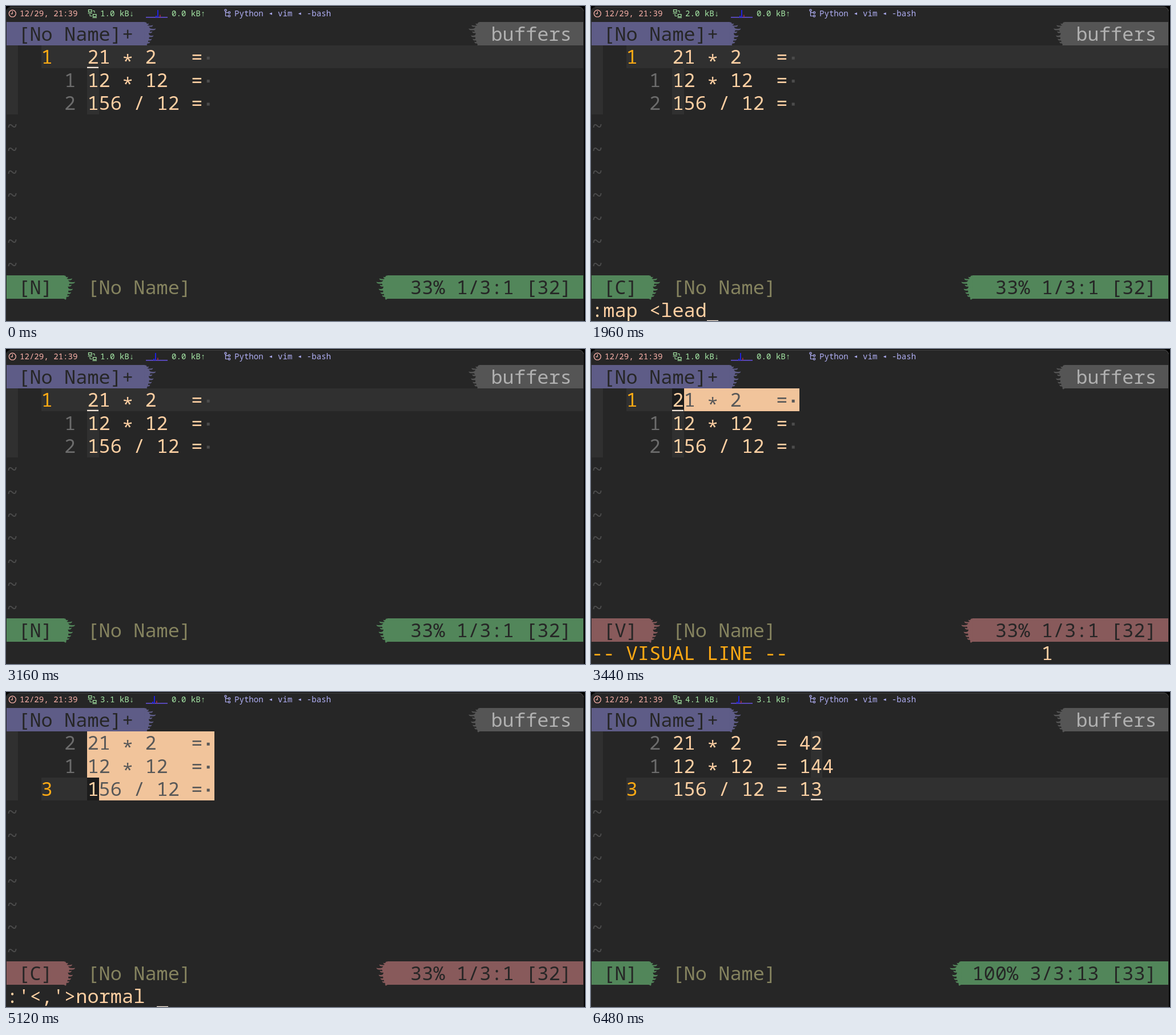
Write an HTML page with a canvas that moves like this. It is 1014x552 px and loops after 6520 ms.

```html
<!DOCTYPE html>
<html lang="en">
<head>
<meta charset="utf-8">
<title>Vim calculator mapping</title>
<style>
html, body { margin: 0; width: 100%; height: 100%; overflow: hidden; background: #000; }
canvas { display: block; width: 1014px; height: 552px; }
</style>
</head>
<body>
<canvas id="stage" width="1014" height="552"></canvas>
<script>
const ctx = document.getElementById('stage').getContext('2d');
const LOOP = 6520;
const CELL = 20.2, LINE = 40.37;
const FONT = '"Noto Sans Mono", "DejaVu Sans Mono", monospace';
const BG = '#262626', SHADE = '#303030', TEXT = '#ffd0a3', SELECT = '#f1c49b';
const GREY = '#6c6c6c', DIM = '#4c4c4c', ORANGE = '#ffaa14', WHITE = '#fff0e2';
const GREEN = '#52865a', RED = '#885a5b', TAB = '#5e5c87';
const PINK = '#f8b0a8', MINT = '#a6e8a6', LILAC = '#b0aff5';

const SUMS = ['21 * 2   =', '12 * 12  =', '156 / 12 ='];
const ANSWERS = ['42', '144', '13'];
const MAP_COMMAND = ':map <leader>cr';
const RUN_COMMAND = ":'<,'>normal ,cr";

// Moments of the session in ms
const AT = { colon: 640, listing: 2360, back: 3000, visual: 3440, line2: 3640, line3: 3800, range: 4040, run: 5760 };

const colX = col => 1 + col * CELL;
const rowY = row => 28.4 + row * LINE;

function rect(x, y, w, h, color) {
  ctx.fillStyle = color;
  ctx.fillRect(x, y, w, h);
}

function cells(col, row, count, color) {
  const x = Math.round(colX(col)), y = Math.round(rowY(row));
  rect(x, y, Math.round(colX(col + count)) - x, Math.round(rowY(row + 1)) - y, color);
}

function write(text, col, row, color) {
  ctx.font = '33.6px ' + FONT;
  ctx.fillStyle = color;
  [...text].forEach((char, i) =>
    ctx.fillText(char, colX(col + i), rowY(row) + (char === '*' ? 40 : 32.5)));
}

function small(text, x, color) {
  ctx.font = '14.1px ' + FONT;
  ctx.fillStyle = color;
  ctx.fillText(text, x, 18);
}

function cursor(col, row) {
  rect(Math.round(colX(col)), rowY(row) + 37.9, 20, 2.2, WHITE);
}

function line(color, width, ...points) {
  ctx.strokeStyle = color;
  ctx.lineWidth = width;
  ctx.beginPath();
  points.forEach(([x, y]) => ctx.lineTo(x, y));
  ctx.stroke();
}

// Ragged edge, one cell wide; side 1 points right, -1 points left
function flame(col, row, color, side) {
  const tips = [[7, 2], [14, 5], [19, 11], [13, 16], [15, 23], [12, 29], [9, 34], [4, 39]];
  ctx.save();
  ctx.translate(colX(side > 0 ? col : col + 1), rowY(row));
  ctx.scale(side, 1);
  ctx.fillStyle = color;
  ctx.beginPath();
  ctx.moveTo(-1, 0);
  ctx.lineTo(2, 0);
  tips.forEach(([x, y]) => {
    ctx.quadraticCurveTo(x * 0.45, y + 2, x, y);
    ctx.quadraticCurveTo(x - 1, y + 4, x * 0.5, y + 3);
  });
  ctx.lineTo(-1, LINE);
  ctx.fill();
  ctx.restore();
}

function drawWindow() {
  rect(0, 0, 1014, 552, '#000');
  ctx.fillStyle = BG;
  ctx.beginPath();
  ctx.roundRect(0, 1, 1012, 570, 9);
  ctx.fill();
  ctx.strokeStyle = '#4a4a4a';
  ctx.lineWidth = 1;
  ctx.beginPath();
  ctx.moveTo(7, 1.8);
  ctx.lineTo(1003, 1.8);
  ctx.quadraticCurveTo(1010, 2, 1011.5, 9);
  ctx.stroke();
}

function drawMeters(t) {
  const tick = Math.floor((t + 950) / 1000);
  const down = ['1.0', '1.0', '2.0', '1.0', '1.0', '2.0', '3.1', '4.1'][tick];
  const up = tick < 7 ? '0.0' : '3.1';

  ctx.strokeStyle = PINK;
  ctx.lineWidth = 1.3;
  ctx.beginPath();
  ctx.arc(11.3, 13.2, 6, 0, 7);
  ctx.stroke();
  line(PINK, 1.2, [11.3, 9], [11.3, 13.7], [8.3, 13.7]);
  small('12/29, 21:39', 24, PINK);

  ctx.strokeStyle = MINT;
  ctx.lineWidth = 1.2;
  ctx.strokeRect(144.5, 6.6, 5.5, 4);
  ctx.strokeRect(152.5, 14.6, 5.5, 4);
  line(MINT, 1, [143.5, 13], [151, 13]);
  line(MINT, 1, [151.5, 20.5], [159, 20.5]);
  line(MINT, 1, [147, 14], [147, 17.5], [151, 17.5]);
  line(MINT, 1, [152, 8.5], [155, 8.5], [155, 12]);
  small(down + ' kB↓', 165, MINT);
  small(up + ' kB↑', 290, MINT);

  const peak = 266 - tick;
  rect(245, 19, 38, 1.6, '#6350d8');
  rect(peak - 1, 7, 1.8, 13, '#2222ee');
  rect(peak - 4, 17, 2, 3, '#2222ee');
  rect(peak + 3, 15.5, 1.6, 4, '#a82848');

  ctx.strokeStyle = LILAC;
  ctx.lineWidth = 1.2;
  for (const [x, y] of [[384.5, 7.5], [391, 11.5], [391, 17.5]]) {
    ctx.beginPath();
    ctx.arc(x, y, 1.7, 0, 7);
    ctx.stroke();
  }
  line(LILAC, 1.2, [384.5, 9.3], [384.5, 17.5], [389, 17.5]);
  line(LILAC, 1.2, [384.5, 11.5], [389, 11.5]);
  small('Python ◂ vim ◂ -bash', 400, LILAC);
}

function drawTabs() {
  cells(0, 0, 12, TAB);
  flame(12, 0, TAB, 1);
  write('[No Name]+', 1, 0, BG);
  cells(41, 0, 9, '#555');
  flame(40, 0, '#555', -1);
  write('buffers', 42, 0, '#b0b0b0');
}

function drawStatus(row, mode, color, done) {
  const start = done ? 32 : 33;
  cells(0, row, 5, color);
  flame(5, row, color, 1);
  write(`[${mode}]`, 1, row, BG);
  write('[No Name]', 7, row, '#85835f');
  cells(start, row, 50 - start, color);
  flame(start - 1, row, color, -1);
  write(done ? '100% 3/3:13 [33]' : '33% 1/3:1 [32]', done ? 33 : 35, row, BG);
}

function drawBuffer(top, current, selecting, done) {
  const cursorCol = done ? 19 : 7;
  SUMS.forEach((sum, i) => {
    const row = top + i, here = i === current;
    const selected = selecting && i <= current;
    cells(0, row, 1, SHADE);
    if (here) cells(3, row, selecting ? 4 : 47, SHADE);
    else cells(cursorCol, row, 1, SHADE);
    if (selected) cells(7, row, 11, SELECT);
    if (selected && here) cells(7, row, 1, '#1c1c1c');

    const distance = Math.abs(i - current);
    write(String(here ? i + 1 : distance), here ? 3 : 5, row, here ? ORANGE : GREY);
    write(sum, 7, row, selected ? '#585858' : TEXT);
    if (selected && here) {
      cells(7, row, 1, '#1c1c1c');
      write(sum[0], 7, row, TEXT);
    }
    if (done) write(ANSWERS[i], 18, row, TEXT);
    else rect(351.7, rowY(row) + 20, 5, 5, selected ? '#585858' : DIM);
  });
  for (let row = top + 3; row < top + 10; row++) write('~', 0, row, DIM);
}

function drawListing() {
  write('n  ,cr', 0, 11, TEXT);
  write('*', 15, 11, DIM);
  let col = 17;
  for (const part of ['0yt=A', '<C-R>', '=', '<C-R>', '"', '<CR>', '<Esc>']) {
    write(part, col, 11, part.length > 1 && part[0] === '<' ? DIM : TEXT);
    col += part.length;
  }
  write('Press ENTER or type command to continue', 0, 12, '#ff8400');
  cursor(39, 12);
}

function drawCommand(text) {
  write(text, 0, 12, TEXT);
  cursor(text.length, 12);
}

function mapTyped(t) {
  const count = t < 1920 ? 1 + (t - AT.colon) / 142.2 : 10 + (t - 1920) / 75;
  return MAP_COMMAND.slice(0, Math.floor(count));
}

function runTyped(t) {
  const count = t < 4280 ? 6 : t < 5200 ? Math.min(13, 7 + (t - 4280) / 130) : 14 + (t - 5200) / 130;
  return RUN_COMMAND.slice(0, Math.floor(count));
}

function draw(t) {
  const listing = t >= AT.listing && t < AT.back;
  const mapping = t >= AT.colon && t < AT.listing;
  const selecting = t >= AT.visual && t < AT.run;
  const ranged = t >= AT.range && t < AT.run;
  const done = t >= AT.run;
  const current = t < AT.line2 ? 0 : t < AT.line3 ? 1 : 2;
  const mode = mapping || listing || ranged ? 'C' : selecting ? 'V' : 'N';

  drawWindow();
  drawMeters(t);
  if (!listing) drawTabs();
  drawBuffer(listing ? 0 : 1, current, selecting, done);
  drawStatus(listing ? 10 : 11, mode, selecting ? RED : GREEN, done);

  if (listing) drawListing();
  else if (mapping) drawCommand(mapTyped(t));
  else if (ranged) drawCommand(runTyped(t));
  else {
    cursor(done ? 19 : 7, current + 1);
    if (selecting) {
      write('-- VISUAL LINE --', 0, 12, ORANGE);
      write(String(current + 1), 39, 12, TEXT);
    }
  }
}

const started = performance.now();
function frame() {
  draw((performance.now() - started) % LOOP);
  requestAnimationFrame(frame);
}
frame();
</script>
</body>
</html>
```
